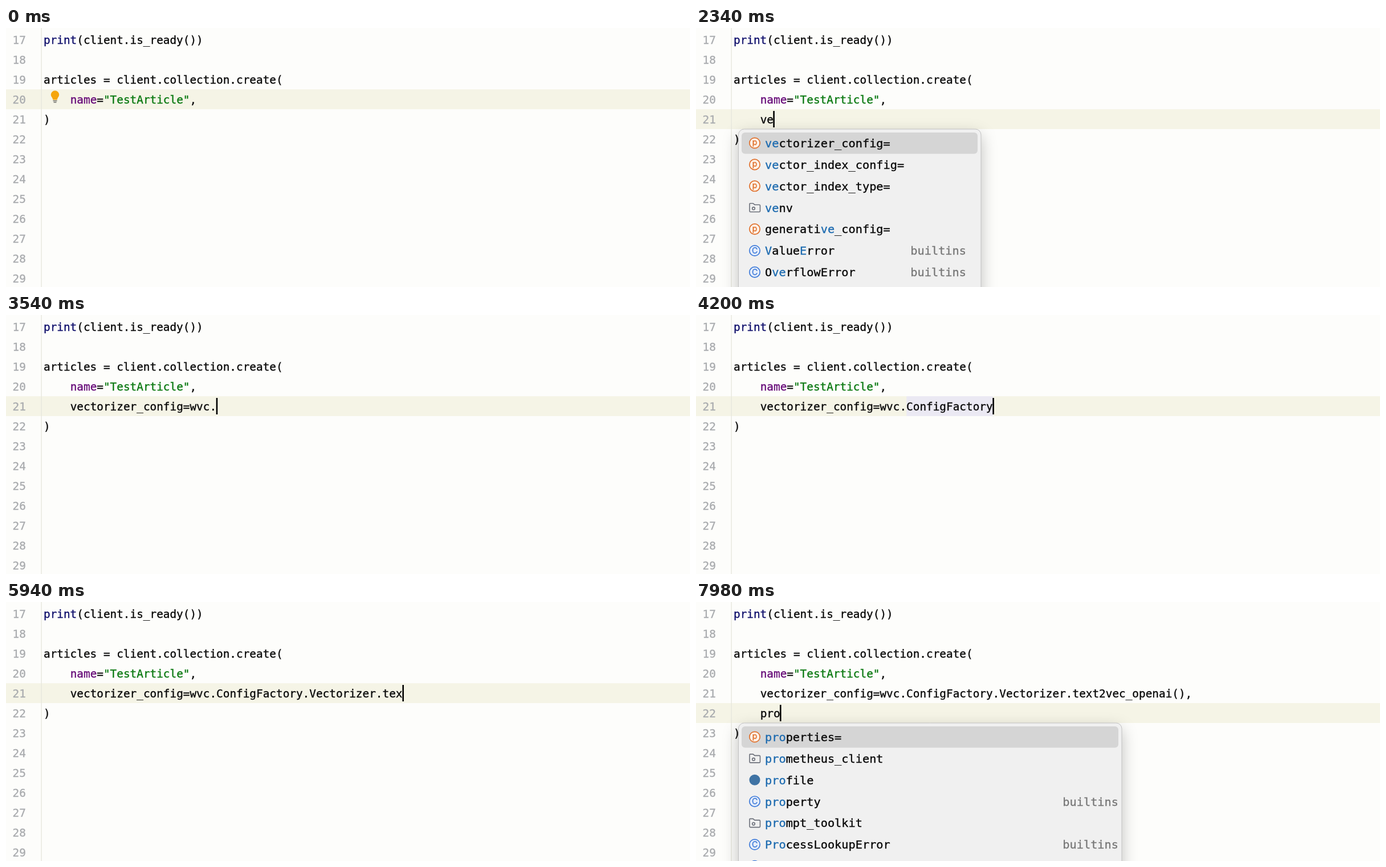
Recreate the animation shown at these times as an HTML page with a canvas. Size 1200x456 px, loop 8 s.

```html
<!DOCTYPE html>
<html lang="en">
<head>
<meta charset="utf-8">
<title>Code completion</title>
<style>
  html, body { margin: 0; width: 100%; height: 100%; overflow: hidden; background: #fdfdfb; }
  canvas { display: block; width: 1200px; height: 456px; }
</style>
</head>
<body>
<canvas id="stage" width="1200" height="456"></canvas>
<script>
const ctx = document.getElementById('stage').getContext('2d');
const LOOP = 8000, BLINK = 500;
const CODE_FONT = '19.38px "DejaVu Sans Mono", monospace';
const LIST_FONT = '20.3px "DejaVu Sans Mono", monospace';
const LEFT = 66, ADVANCE = 11.668, ROW = 35, FIRST_LINE = 17;

const PAPER = '#fdfdfb', CURRENT_ROW = '#f5f4e6', GUTTER = '#e6e6dc', LINE_NUMBER = '#a9abae';
const INK = '#080808', NAVY = '#10106c', PURPLE = '#660a78', GREEN = '#08780f';
const MATCH = '#1d6bb0', MUTED = '#777777';

const CONFIG = 'vectorizer_config=';
const FACTORY = CONFIG + 'wvc.ConfigFactory';
const VECTORIZER = FACTORY + '.Vectorizer';
const CALL = VECTORIZER + '.text2vec_openai()';

// Editor states: start time, caret line, text on that line.
const STEPS = [
  [-700, 20, 'name="TestArticle",'],
  [1080, 21, ''],
  [1920, 21, 'v'],
  [2100, 21, 've'],
  [2640, 21, CONFIG],
  [3120, 21, CONFIG + 'w'],
  [3300, 21, CONFIG + 'wv'],
  [3420, 21, CONFIG + 'wvc'],
  [3540, 21, CONFIG + 'wvc.'],
  [3660, 21, CONFIG + 'wvc.C'],
  [3780, 21, CONFIG + 'wvc.Co'],
  [3900, 21, FACTORY],
  [4440, 21, FACTORY + '.'],
  [4620, 21, FACTORY + '.V'],
  [4740, 21, FACTORY + '.Ve'],
  [4920, 21, VECTORIZER],
  [5520, 21, VECTORIZER + '.'],
  [5640, 21, VECTORIZER + '.t'],
  [5760, 21, VECTORIZER + '.te'],
  [5880, 21, VECTORIZER + '.tex'],
  [6120, 21, CALL],
  [7080, 21, CALL + ','],
  [7260, 22, ''],
  [7560, 22, 'p'],
  [7680, 22, 'pr'],
  [7800, 22, 'pro']
].map(([start, line, text]) => ({ start, line, text }));

// Completion lists; text between bars is the matched part.
const POPUPS = [
  { from: 2160, to: 2640, top: 178, right: 500, noteEnd: 474, items: [
    ['param', '|ve|ctorizer_config='],
    ['param', '|ve|ctor_index_config='],
    ['param', '|ve|ctor_index_type='],
    ['folder', '|ve|nv'],
    ['param', 'generati|ve|_config='],
    ['class', '|V|alue|E|rror', 'builtins'],
    ['class', 'O|ve|rflowError', 'builtins']
  ] },
  { from: 7800, to: LOOP, top: 213, right: 747, noteEnd: 741, items: [
    ['param', '|pro|perties='],
    ['folder', '|pro|metheus_client'],
    ['module', '|pro|file'],
    ['class', '|pro|perty', 'builtins'],
    ['folder', '|pro|mpt_toolkit'],
    ['class', '|Pro|cessLookupError', 'builtins'],
    ['class', '']
  ] }
];

const rowTop = line => 3 + (line - FIRST_LINE) * ROW;
const columnX = column => LEFT + column * ADVANCE;

function box(x, y, w, h, color) {
  ctx.fillStyle = color;
  ctx.fillRect(x, y, w, h);
}

function rounded(x, y, w, h, r) {
  ctx.beginPath();
  ctx.roundRect(x, y, w, h, r);
}

function circle(x, y, r) {
  ctx.beginPath();
  ctx.arc(x, y, r, 0, Math.PI * 2);
}

// A hairline outline gives the slightly heavier editor weight.
function text(value, x, y, color, font) {
  ctx.font = font;
  ctx.fillStyle = ctx.strokeStyle = color;
  ctx.lineWidth = 0.35;
  ctx.fillText(value, x, y);
  ctx.strokeText(value, x, y);
  return x + ctx.measureText(value).width;
}

function code(line, column, ...parts) {
  let x = columnX(column);
  for (const [value, color = INK] of parts) {
    x = text(value, x, rowTop(line) + 24.5, color, CODE_FONT);
  }
}

function bulb(line) {
  const y = rowTop(line);
  ctx.fillStyle = '#f5a50c';
  circle(86, y + 9.5, 7.2);
  ctx.fill();
  ctx.beginPath();
  ctx.moveTo(80.5, y + 13);
  ctx.lineTo(91.5, y + 13);
  ctx.lineTo(89.5, y + 18.5);
  ctx.lineTo(82.5, y + 18.5);
  ctx.fill();
  box(82.5, y + 19.5, 7, 1.5, '#6c6c68');
  box(83.5, y + 22, 5, 1.5, '#6c6c68');
}

function badge(letter, y, stroke, fill) {
  circle(103, y, 9.2);
  ctx.fillStyle = fill;
  ctx.fill();
  ctx.strokeStyle = stroke;
  ctx.lineWidth = 1.7;
  ctx.stroke();
  ctx.textAlign = 'center';
  text(letter, 103, y + (letter === 'p' ? 3.8 : 5), stroke, '14px Inter, sans-serif');
  ctx.textAlign = 'left';
}

const icons = {
  param: y => badge('p', y, '#e0702c', '#fdf2e8'),
  class: y => badge('C', y, '#3f7bd9', '#e6eefa'),
  folder(y) {
    ctx.strokeStyle = '#6c707a';
    ctx.lineWidth = 1.6;
    ctx.beginPath();
    ctx.moveTo(95, y - 7.5);
    ctx.lineTo(100, y - 7.5);
    ctx.lineTo(103, y - 5);
    ctx.lineTo(111, y - 5);
    ctx.quadraticCurveTo(112.5, y - 5, 112.5, y - 3.5);
    ctx.lineTo(112.5, y + 6);
    ctx.quadraticCurveTo(112.5, y + 7.5, 111, y + 7.5);
    ctx.lineTo(95.5, y + 7.5);
    ctx.quadraticCurveTo(94, y + 7.5, 94, y + 6);
    ctx.lineTo(94, y - 6.5);
    ctx.quadraticCurveTo(94, y - 7.5, 95, y - 7.5);
    ctx.stroke();
    circle(101, y + 1.5, 2.3);
    ctx.stroke();
  },
  module(y) {
    circle(103, y, 9.5);
    ctx.fillStyle = '#3f73a4';
    ctx.fill();
  }
};

function popup({ top, right, noteEnd, items }) {
  ctx.save();
  ctx.shadowColor = 'rgba(0, 0, 0, 0.25)';
  ctx.shadowBlur = 28;
  ctx.shadowOffsetY = 10;
  rounded(74.5, top, right - 74.5, 330, 10);
  ctx.fillStyle = '#f0f0f0';
  ctx.fill();
  ctx.restore();
  ctx.strokeStyle = '#c2c2c2';
  ctx.lineWidth = 1;
  ctx.stroke();

  rounded(80, top + 6, right - 86, 37.5, 6);
  ctx.fillStyle = '#d5d5d5';
  ctx.fill();

  items.forEach(([icon, label, note], i) => {
    const y = top + 24.5 + i * 37.9;
    icons[icon](y);
    let x = 121;
    label.split('|').forEach((part, j) => {
      x = text(part, x, y + 7.3, j % 2 ? MATCH : INK, LIST_FONT);
    });
    if (note) {
      ctx.textAlign = 'right';
      text(note, noteEnd, y + 7.3, MUTED, LIST_FONT);
      ctx.textAlign = 'left';
    }
  });
}

function highlights(state, age) {
  const y = rowTop(21);
  const mark = (from, to, color) =>
    box(columnX(4 + from), y, (to - from) * ADVANCE, ROW, color);
  const { length } = state.text;
  if (state.text === CALL) mark(length - 2, length, '#93d9d2');
  const selected = state.text === FACTORY || state.text === VECTORIZER;
  if (selected && age >= 240) mark(state.text.lastIndexOf('.') + 1, length, '#ebe9f3');
}

function draw(t) {
  const state = STEPS.findLast(step => step.start <= t);
  const age = t - state.start;

  box(0, 0, 1200, 456, PAPER);
  box(0, rowTop(state.line), 1200, ROW, CURRENT_ROW);
  box(61.5, 0, 1.3, 456, GUTTER);
  highlights(state, age);

  for (let line = FIRST_LINE; line < 30; line++) {
    text(line, 11.5, rowTop(line) + 24.5, LINE_NUMBER, CODE_FONT);
  }
  code(17, 0, ['print', NAVY], ['(client.is_ready())']);
  code(19, 0, ['articles = client.collection.create(']);
  code(20, 4, ['name', PURPLE], ['='], ['"TestArticle"', GREEN], [',']);
  if (state.line === 22) code(21, 4, [CALL + ',']);
  if (state.line > 20) code(state.line, 4, [state.text]);
  code(state.line + 1, 0, [')']);

  if (state.line === 20 || (state.text === CALL && age >= 400)) bulb(state.line);
  if (Math.floor(age / BLINK) % 2 === 0) {
    box(columnX(4 + state.text.length) - 0.7, rowTop(state.line) + 3, 2.6, 29, '#000');
  }
  POPUPS.filter(p => t >= p.from && t < p.to).forEach(popup);
}

const started = performance.now();
function tick() {
  draw((performance.now() - started) % LOOP);
  requestAnimationFrame(tick);
}
tick();
</script>
</body>
</html>
```
